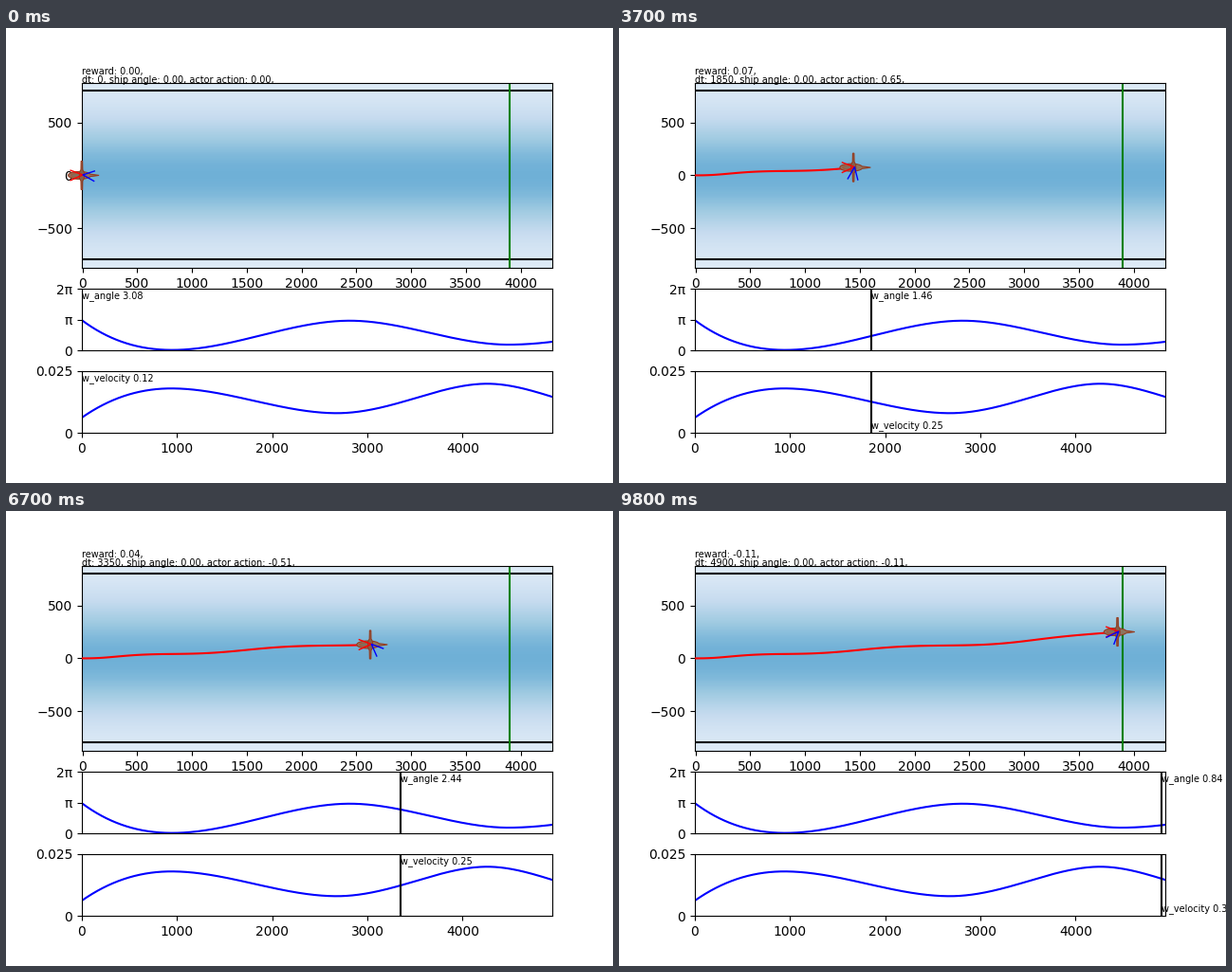
Recreate the animation shown at these times as a matplotlib script. Size 640 px wide and 480 px high, loop 9.9 s.

```python
import math

import matplotlib.pyplot as plt
import numpy as np
from matplotlib.animation import FuncAnimation

FRAMES, STEP = 99, 50
T_MAX = 4943
GOAL_X, BANK_Y = 3900, 800
X_MIN, X_MAX, Y_MAX = -5, GOAL_X * 1.1, BANK_Y * 1.1


def hermite(t, knots):
    """Piecewise cubic through (time, value, slope) knots."""
    xs, ys, m = np.array(knots, float).T
    k = np.clip(np.searchsorted(xs, t, side="right") - 1, 0, len(xs) - 2)
    h = xs[k + 1] - xs[k]
    u = (t - xs[k]) / h
    rise = u * u * (3 - 2 * u)
    return (ys[k] + rise * (ys[k + 1] - ys[k])
            + h * u * (1 - u) * ((1 - u) * m[k] - u * m[k + 1]))


# Wind over time, from its turning points
ts = np.arange(T_MAX + 1)
angle = hermite(ts, [(0, 3.08, -0.0072), (950, 0.055, 0), (2815, 3.03, 0),
                     (4480, 0.597, 0), (T_MAX, 0.89, 0.0012)])
speed = hermite(ts, [(0, 0.0062, 2.7e-5), (940, 0.018, 0), (2680, 0.008, 0),
                     (3350, 0.01235, 1.085e-5), (4260, 0.0199, 0),
                     (T_MAX, 0.0146, -1.2e-5)])

# The ship runs at a steady pace and the crosswind pushes it with some inertia
ship_x = 0.7905 * ts - 14 * (1 - np.exp(-ts / 200))
push = 2.205 * np.sin(angle) * speed**0.75
drift = np.zeros(len(ts))
for i in ts[1:]:
    drift[i] = drift[i - 1] + (push[i] - drift[i - 1]) / 110
ship = np.column_stack([ship_x, np.cumsum(drift)])


def reward(t):
    return 0.09 - 3.18e-6 * ship[t, 1]**2 if t else 0


def action(t):
    return np.interp(t, [0, 500, 1350, 2300, 3350, 4250, 4900],
                     [0, -0.08, 0.70, 0.61, -0.51, 0.44, -0.11])


fig, (river, angle_ax, speed_ax) = plt.subplots(
    3, 1, figsize=(6.4, 4.8), dpi=100, gridspec_kw={"height_ratios": [3, 1, 1]})

# River with its current, banks and finish line
ys = np.linspace(-Y_MAX, Y_MAX, 256)
current = 0.09 + 0.4 * np.exp(-ys**2 / (2 * 400**2))
river.imshow(current[:, None], cmap="Blues", vmin=0, vmax=1, origin="lower",
             extent=(X_MIN, X_MAX, -Y_MAX, Y_MAX), aspect="auto",
             interpolation="bilinear")
river.set(xlim=(X_MIN, X_MAX), ylim=(-Y_MAX, Y_MAX), yticks=[-500, 0, 500])
for y in (-BANK_Y, BANK_Y):
    river.axhline(y, color="black")
river.axvline(GOAL_X, color="green")

# Wind plots
for ax, values in ((angle_ax, angle), (speed_ax, speed)):
    ax.plot(ts, values, color="blue")
angle_ax.set(xlim=(0, T_MAX), ylim=(0, 2 * math.pi), xticks=[])
angle_ax.set_yticks([0, math.pi, 2 * math.pi], ["0", "π", "2π"])
speed_ax.set(xlim=(0, T_MAX), ylim=(0, 0.025))
speed_ax.set_yticks([0, 0.025], ["0", "0.025"])
cursors = [ax.axvline(0, color="black") for ax in (angle_ax, speed_ax)]

reward_text = river.text(X_MIN, 960, "", fontsize=7)
state_text = river.text(X_MIN, 880, "", fontsize=7)
angle_text = angle_ax.text(0, 2 * math.pi - 1, "", fontsize=7)
speed_text = speed_ax.text(0, 0, "", fontsize=7)

# Ship parts are given in pixels around the ship's position
PX = np.array([(X_MAX - X_MIN) / 496, 2 * Y_MAX / 195.7])


def part(shape, face, edge, z):
    patch, = river.fill(*shape.T, facecolor=face, edgecolor=edge, lw=0.8,
                        zorder=z, clip_on=False)
    return patch, shape


def ellipse(x, rx, ry):
    a = np.linspace(0.3, 2 * math.pi - 0.3, 24)
    return np.column_stack([x + rx * np.cos(a), ry * np.sin(a)])


hull = np.vstack([ellipse(-3, 12, 4), [(12, -0.8), (17.5, 0), (12, 0.8)]])
side = np.array([(0.7, 15), (0.9, 6), (2.5, 3), (2.5, -3), (0.9, -6), (0.7, -15)])
mast = np.vstack([side, side[::-1] * (-1, 1)]) - (0.7, 0)
parts = [part(hull, "#8d7561", "#963c20", 4),
         part(ellipse(-5, 7, 2), "#80705f", "#a8563a", 4.1),
         part(mast, "#85604c", "#963c20", 4.2)]


def curve(color, z, **style):
    return river.plot([], [], color=color, zorder=z, **style)[0]


trail = curve("red", 3)
heading = curve("red", 5, lw=1, clip_on=False)
wind = curve("blue", 5.1, lw=1, clip_on=False)


def head(direction):
    """Arrowhead with its tip on the ship."""
    spread = math.radians(23)
    arms = [(-13.5 * math.cos(direction + s), -13.5 * math.sin(direction + s))
            for s in (-spread, spread)]
    return np.array([arms[0], (0.5, 0.5), arms[1]])


def update(i):
    t = i * STEP
    pos = ship[t]
    for patch, shape in parts:
        patch.set_xy(pos + shape * PX)
    heading.set_data(*(pos + head(0) * PX).T)
    wind.set_data(*(pos + head(angle[t]) * PX).T)
    trail.set_data(*ship[:t + 1:STEP].T)

    reward_text.set_text(f"reward: {reward(t):.2f},")
    state_text.set_text(f"dt: {t}, ship angle: 0.00, actor action: {action(t):.2f},")
    for cursor in cursors:
        cursor.set_xdata([t, t])
    angle_text.set_x(t)
    angle_text.set_text(f"w_angle {angle[t]:.2f}")
    # The label keeps clear of the curve
    speed_text.set_position((t, 0.021 if speed[t] < 0.0125 else 0.002))
    speed_text.set_text(f"w_velocity {20 * speed[t]:.2f}")
    return []


anim = FuncAnimation(fig, update, frames=FRAMES, interval=100, repeat=True,
                     repeat_delay=0)
plt.show()
```
